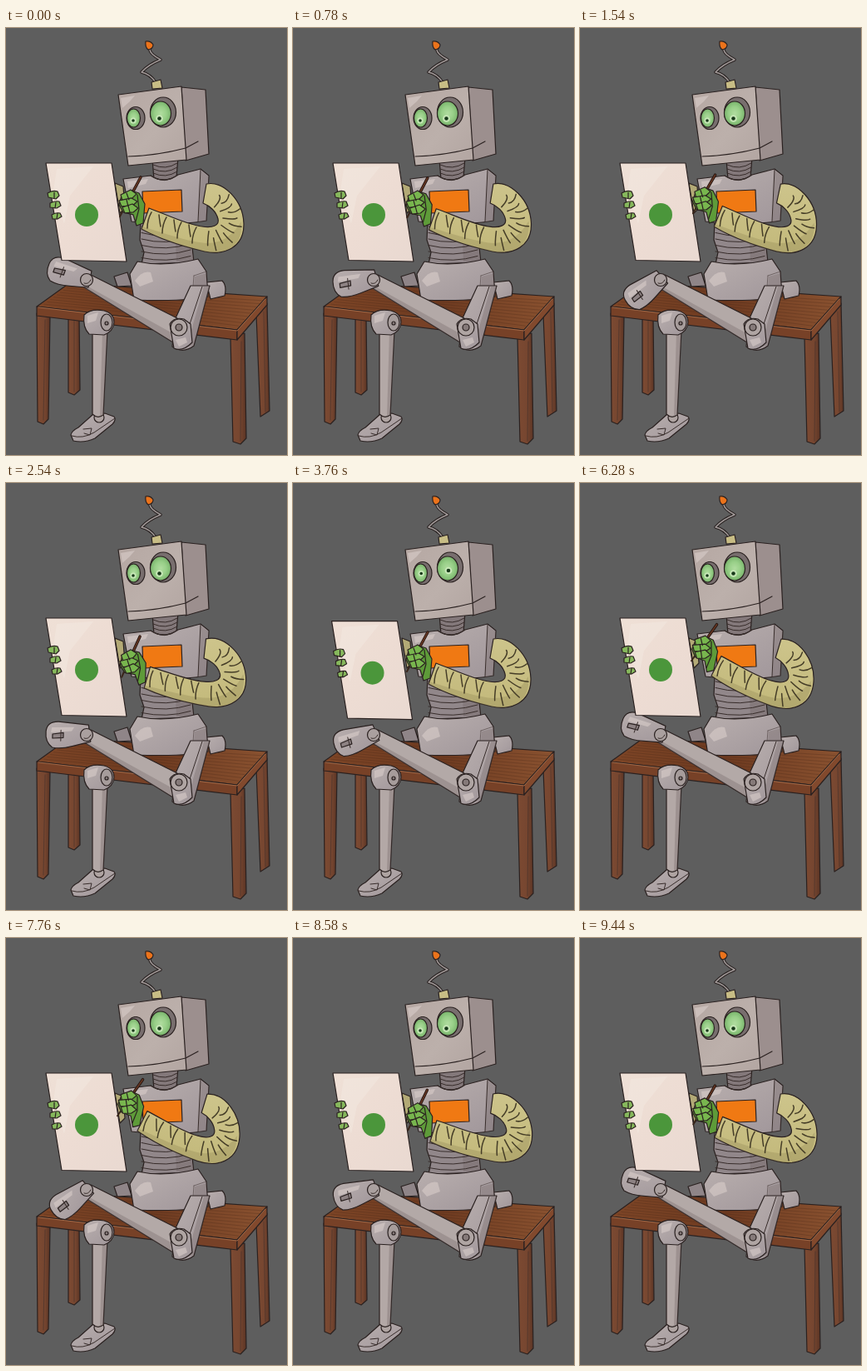
Animation of 338x512 px, one loop 9480 ms. Source, as an HTML page:

```html
<!DOCTYPE html>
<html lang="en">
<head>
<meta charset="utf-8">
<title>Drawing robot</title>
<style>
html, body { margin: 0; width: 100%; height: 100%; overflow: hidden; background: #5e5e5e; }
svg { display: block; width: 338px; height: 512px; }
path, circle, ellipse { stroke-linejoin: round; stroke-linecap: round; }
.ink { stroke: #2a2120; stroke-width: 1.2; }
.line { fill: none; stroke: #382d2b; stroke-width: 1; }
.shade { fill: #6a5c5c; opacity: .3; }
.light { fill: #d8cdca; opacity: .6; }
</style>
</head>
<body>
<svg viewBox="0 0 338 512">
  <defs>
    <linearGradient id="metal" x1="0" y1="0" x2="1" y2="1">
      <stop offset="0" stop-color="#b9afae"/><stop offset="1" stop-color="#a0969a"/>
    </linearGradient>
    <linearGradient id="face" x1="0" y1="0" x2="1" y2="1">
      <stop offset="0" stop-color="#b5a7a2"/><stop offset=".55" stop-color="#bcb0ab"/><stop offset="1" stop-color="#b2a5a1"/>
    </linearGradient>
    <linearGradient id="wood" x1="0" y1="0" x2="1" y2="0">
      <stop offset="0" stop-color="#7d4526"/><stop offset=".5" stop-color="#6d3a20"/><stop offset="1" stop-color="#8a5230"/>
    </linearGradient>
    <linearGradient id="leg" x1="0" y1="0" x2="1" y2="0">
      <stop offset="0" stop-color="#7c4a32"/><stop offset=".6" stop-color="#764630"/><stop offset="1" stop-color="#5a3424"/>
    </linearGradient>
    <linearGradient id="sheet" x1="0" y1="0" x2="1" y2="1">
      <stop offset="0" stop-color="#efe0d6"/><stop offset=".5" stop-color="#eddcd3"/><stop offset="1" stop-color="#e9d9d1"/>
    </linearGradient>
    <linearGradient id="cloth" x1="0" y1="0" x2="0" y2="1">
      <stop offset="0" stop-color="#cdc48b"/><stop offset="1" stop-color="#c3b97b"/>
    </linearGradient>
    <radialGradient id="iris">
      <stop offset="0" stop-color="#b0dc9f"/><stop offset=".55" stop-color="#98cf88"/><stop offset="1" stop-color="#79b46c"/>
    </radialGradient>
  </defs>

  <g id="bench">
    <path class="ink" fill="url(#leg)" d="M75 343L88 345L89 434L82 440L75 437Z"/>
    <path class="ink" fill="url(#leg)" d="M301 343L314 330L317 459L306 466Z"/>
    <path class="ink" fill="url(#leg)" d="M37 342L53 345L51 469L45 475L38 472Z"/>
    <path class="ink" fill="url(#leg)" d="M270 370L287 366L289 492L282 499L273 496Z"/>
    <path class="ink" fill="url(#wood)" d="M37 334L76 306L314 322L278 362Z"/>
    <path id="grain" fill="none" stroke="#4a281a" stroke-width="1" opacity=".3"/>
    <path class="ink" fill="#774127" d="M37 334L278 362V374L37 345Z"/>
    <path class="ink" fill="#82492d" d="M278 362L314 322V332L278 374Z"/>
    <path fill="none" stroke="#a36a48" d="M39 335L278 363L312 325"/>
    <path class="line" opacity=".5" d="M47 350L45 470M283 376L282 495M310 340L312 460M82 350V436"/>
  </g>

  <g id="standing-leg">
    <path class="ink" fill="url(#metal)" d="M78 488Q79 483 87 479L105 463L119 462L130 466Q133 470 128 475L107 492Q94 498 81 495Z"/>
    <path class="line" d="M79 489Q92 493 106 485L131 468M93 481L103 480L101 488L94 486"/>
    <circle class="ink" cx="112" cy="467" r="6" fill="#aea3a1"/>
    <path class="ink" fill="#b3a8a6" d="M104 364L122 362L117 464Q110 469 104 463Z"/>
    <path class="shade" d="M116 364L122 363L117 464L113 466Z"/>
    <path class="ink" fill="url(#metal)" d="M94 344Q102 336 118 339Q130 342 130 353Q129 364 118 368L100 367Q92 359 94 344Z"/>
    <path class="light" d="M98 345L111 341L108 351L98 354Z"/>
    <ellipse class="ink" cx="121" cy="353" rx="7" ry="10" fill="#a69c9b"/>
    <circle class="ink" cx="121" cy="354" r="2" fill="#857978"/>
  </g>

  <g id="body">
    <path class="ink" fill="#8f8588" d="M130 298L146 293L151 309L134 310Z"/>
    <path class="ink" fill="url(#metal)" d="M241 305L260 303Q266 309 263 321L246 325Z"/>
    <path class="ink" fill="#91878a" d="M162 232L222 231L219 245L224 263L226 281L163 283L166 269L161 254Z"/>
    <path class="shade" d="M203 232H222L219 245L226 280H205Z"/>
    <path id="waist" class="line"/>
    <path class="ink" fill="url(#metal)" d="M149 295L158 280Q190 287 231 277L241 292L243 322Q222 328 154 326Z"/>
    <path class="line" opacity=".5" d="M226 297L241 292M226 297L224 324"/>
    <path class="light" d="M155 303Q164 290 174 293L177 304L161 310Z"/>
    <path class="shade" d="M227 298L241 294L242 322H225Z"/>
    <path class="ink" fill="#83787a" d="M176 158L207 155L205 179Q193 187 178 181Z"/>
    <path id="neck" class="line"/>
    <path class="ink" fill="#b3aa76" d="M131 186L141 190L143 216L137 222Z"/>
    <path class="ink" fill="url(#metal)" d="M141 181L174 177Q190 188 207 176L234 169L244 177L241 231Q201 238 151 232Z"/>
    <path class="shade" d="M234 171L244 178L241 231L231 233Z"/>
    <path class="light" d="M146 184L171 181L168 187L147 192Z"/>
    <path class="line" d="M234 170L231 232M174 177Q191 189 207 176"/>
    <path class="ink" fill="#f07913" d="M164 196L211 194L212 220L165 222Z"/>
  </g>

  <g id="head">
    <path fill="none" stroke="#282120" stroke-width="3.6" d="M173 26Q173 31 186 38Q171 44 163 53Q173 55 180 65"/>
    <path fill="none" stroke="#a19998" stroke-width="1.5" d="M173 26Q173 31 186 38Q171 44 163 53Q173 55 180 65"/>
    <path class="ink" fill="#eb731b" d="M168 16Q174 15 177 20Q177 25 171 26Q167 23 168 16Z"/>
    <path class="ink" fill="#c8bd85" d="M175 65L186 62L188 72L176 73Z"/>
    <path class="ink" fill="#9c8f8e" d="M211 71L240 74L244 151L216 159Z"/>
    <path class="ink" fill="url(#face)" d="M135 80L211 70L217 158L147 165Z"/>
    <path class="light" d="M138 84L155 81L149 88L140 96Z"/>
    <path class="ink" fill="none" d="M147 154Q182 153 216 144L231 136"/>
    <ellipse class="ink" cx="156" cy="108" rx="11" ry="13.5" fill="#786e6e"/>
    <ellipse class="ink" cx="153.5" cy="108" rx="8" ry="11" fill="url(#iris)"/>
    <ellipse class="ink" cx="189" cy="101" rx="15.5" ry="18" fill="#786e6e"/>
    <ellipse class="ink" cx="186" cy="102.5" rx="12.5" ry="14.5" fill="url(#iris)"/>
    <g id="left-pupil">
      <circle cx="153" cy="111" r="3.5" fill="#c8e8b8"/><circle cx="153" cy="111" r="1.8" fill="#18391a"/>
    </g>
    <g id="right-pupil">
      <circle cx="184.5" cy="108.5" r="4.3" fill="#c8e8b8"/><circle cx="184.5" cy="108.5" r="2.3" fill="#18391a"/>
    </g>
  </g>

  <g id="crossed-leg">
    <path class="ink" fill="url(#metal)" d="M222 309L245 309L226 381Q213 391 200 382L203 350Z"/>
    <path class="shade" d="M238 310L245 310L226 380L217 383Z"/>
    <path class="line" d="M236 310L218 364"/>
    <path class="ink" fill="#b3a9a7" d="M102 296L206 348L201 377L94 311Z"/>
    <path class="shade" d="M95 308L202 367L201 377L94 312Z"/>
    <path class="ink" fill="url(#metal)" d="M197 355Q202 346 214 349L222 355L224 377Q212 389 202 384Z"/>
    <circle class="ink" cx="208" cy="359" r="10" fill="#afa5a3"/>
    <circle class="ink" cx="208" cy="359" r="4" fill="#857a79"/>
    <path class="light" d="M204 374L216 371L218 377L208 382Z"/>
    <g id="foot">
      <path class="ink" fill="url(#metal)" d="M2 -12L-34 -15Q-48 -15 -49 -3Q-50 10 -41 16Q-31 18 -17 14L5 8Z"/>
      <path class="light" d="M-42 -8L-15 -9L-18 -4L-43 -2Z"/>
      <path class="ink" fill="#8d8283" d="M-41 0L-28 -2V4L-41 5Z"/>
      <path class="line" d="M-31 -5V8"/>
    </g>
    <circle class="ink" cx="97" cy="302" r="7.5" fill="#aaa09f"/>
    <path class="line" d="M94 306Q99 308 102 302"/>
  </g>

  <g id="paper">
    <path class="ink" fill="url(#sheet)" d="M48 162L127 162L145 280L67 278.5Z"/>
    <path fill="#f4e9e1" opacity=".5" d="M61 169L105 166L77 201L70 235L57 195Z"/>
    <circle cx="97" cy="224" r="14" fill="#4b963b"/>
    <g class="ink" fill="#86b85c" stroke-width="1">
      <path d="M50 198Q56 194 62 196L64 201L60 205L51 203Z"/>
      <path d="M53 210Q59 207 64 208L66 213L61 216L53 215Z"/>
      <path d="M55 224Q60 221 65 222L67 226L62 229L56 229Z"/>
      <path fill="none" d="M58 197V204M60 209L59 216M62 222L61 229"/>
    </g>
  </g>

  <g id="arm">
    <path fill="none" stroke="#241713" stroke-width="3.5" d="M162 179L147 207"/>
    <path fill="none" stroke="#653521" stroke-width="1.7" d="M162 179L147 207"/>
    <path fill="none" stroke="#39251a" stroke-width="2" d="M147 207L137 226"/>
    <path class="ink" fill="#5e9b39" d="M139 201L151 195L160 198L167 211L165 234L157 237L153 224L141 221L136 212Z"/>
    <g class="ink" fill="#78b64e">
      <path d="M138 200L150 194L157 199L151 205L140 207Z"/>
      <path d="M136 207L151 204L158 208L151 214L139 214Z"/>
      <path d="M140 215L152 211L159 216L153 221L143 222Z"/>
      <path fill="none" d="M145 198L148 206M145 206L147 214M147 213L149 221M158 200L160 217L156 232"/>
    </g>
    <path class="ink" fill="url(#cloth)" d="M241 187C262 183 285 207 286 234C287 263 263 273 239 268C213 262 185 253 163 241L172 216C194 224 218 236 236 238C248 240 257 237 255 229C253 220 245 213 237 210Z"/>
    <path fill="#8b8050" opacity=".3" d="M164 238C190 246 218 256 240 258Q267 259 283 232C286 262 265 272 239 268C212 262 185 252 163 241Z"/>
    <path id="wrinkles" fill="none" stroke="#453d27" stroke-width="1.5"/>
  </g>
</svg>
<script>
const LOOP = 9480, STROKE = 1480, DRAWING = 3700;
const el = id => document.getElementById(id);
const range = (n, f) => Array.from({ length: n }, (_, i) => f(i));
const setPath = (id, parts) => el(id).setAttribute('d', parts.join(''));
const move = (id, transform) => el(id).setAttribute('transform', transform);
const smooth = (a, b, t) => {
  const x = Math.min(1, Math.max(0, (t - a) / (b - a)));
  return x * x * (3 - 2 * x);
};

setPath('waist', range(6, i => `M163 ${238 + i * 7.5}Q193 ${247 + i * 7} 222 ${236 + i * 7.5}`));
setPath('neck', range(4, i => `M177 ${164 + i * 5}Q192 ${171 + i * 5} 206 ${162 + i * 5}`));
setPath('grain', range(9, i => {
  const u = (i + 1) / 10, x = 76 - 39 * u, y = 306 + 28 * u;
  return `M${x + 5} ${y}Q170 ${316 + 29 * u} ${312 - 36 * u} ${323 + 38 * u}`;
}));

// Folds fan out round the bend, then run across the forearm.
const bendFolds = range(11, i => {
  const a = (-72 + i * 17) * Math.PI / 180, c = Math.cos(a), s = Math.sin(a);
  const inner = i % 2 ? 23 : 15, outer = i % 2 ? 37 : 31;
  return `M${246 + inner * c} ${229 + inner * s}Q${249 + 26 * c - 3 * s} ${229 + 26 * s + 3 * c} ${247 + outer * c} ${230 + outer * s}`;
});
const forearmFolds = range(7, i => {
  const x = 175 + i * 9, y = 221 + i * 3;
  return `M${x} ${y}q${i % 2 ? 1 : -5} 9 ${i % 2 ? 2 : -5} ${i % 2 ? 14 : 19}`;
});
setPath('wrinkles', [...bendFolds, ...forearmFolds]);

function armAngle(t) {
  const s = Math.sin(Math.min(t, DRAWING) / STROKE * 2 * Math.PI);
  return s * (s > 0 ? 8.2 : 3.8);
}

const footDrop = t => smooth(0, 1580, t) - smooth(1640, 3140, t) + smooth(3160, 4160, t);

function render(t) {
  const look = smooth(3400, 4300, t), lower = smooth(3300, 4000, t);
  move('arm', `rotate(${armAngle(t)} 240 195)`);
  move('foot', `translate(97 302) rotate(${20 - 53 * footDrop(t)})`);
  move('paper', `translate(${-2 * lower} ${5 * lower})`);
  move('left-pupil', `translate(${3.5 * look} ${-7 * look})`);
  move('right-pupil', `translate(${7 * look} ${-10 * look})`);
}

// The scene plays forward, then backward.
function tick(now) {
  const t = now % LOOP;
  render(Math.min(t, LOOP - t));
  requestAnimationFrame(tick);
}
render(0);
requestAnimationFrame(tick);
</script>
</body>
</html>
```
